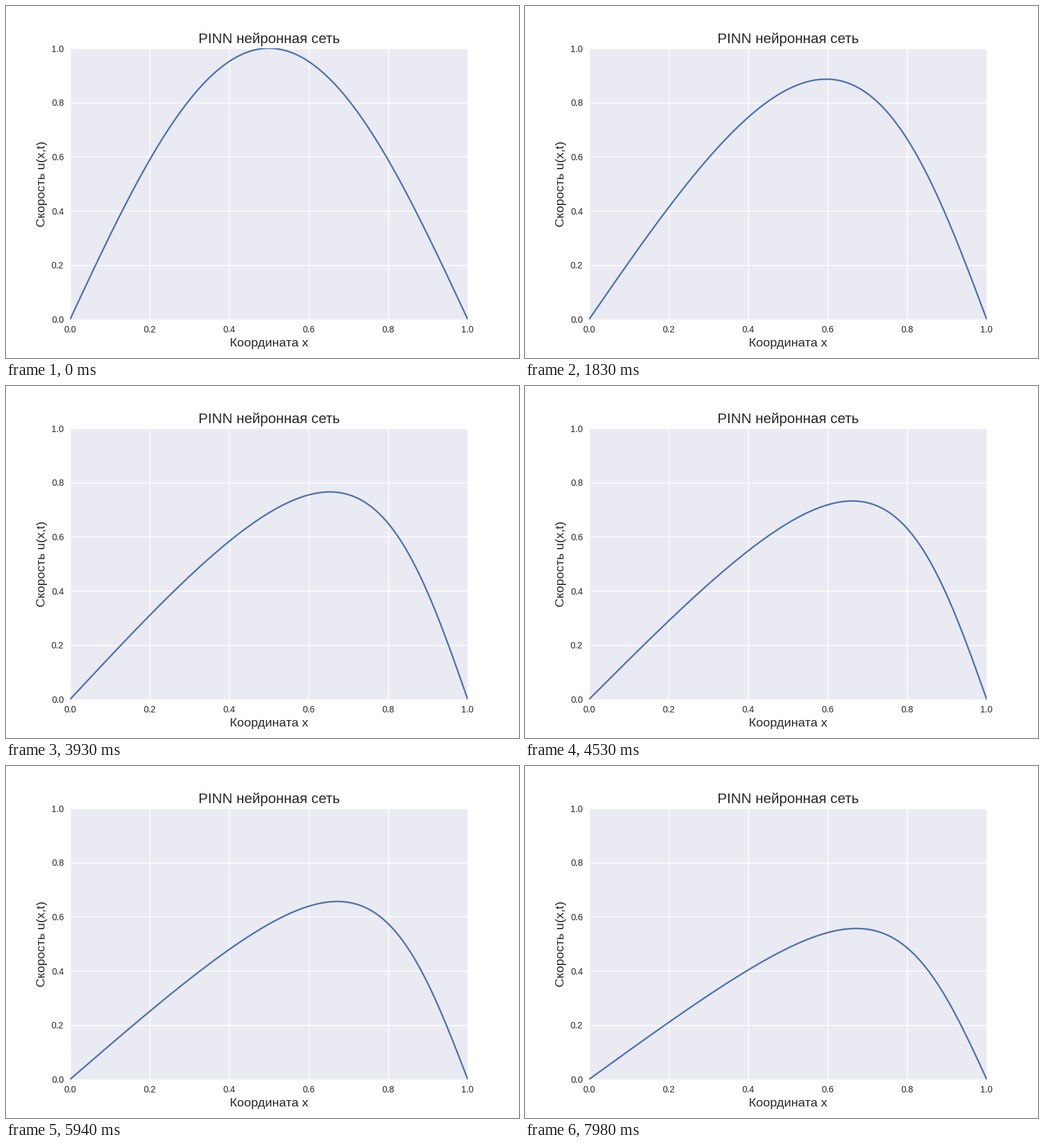
These frames come from a looping animation (800x550 px, 8 s). A matplotlib script:

```python
import numpy as np
import matplotlib.pyplot as plt
from matplotlib.animation import FuncAnimation

plt.style.use("seaborn-v0_8")
plt.rcParams["font.family"] = "Liberation Sans"

NU = 0.1           # viscosity
DT = 0.002         # model time per step
STEP_MS = 30       # screen time per step
INTERVAL = 20
LOOP_MS = 8000

x = np.linspace(0, 1, 301)
n = np.arange(1, 16)[:, None]

# Bessel coefficients I_n(z) of the Cole-Hopf series
z = 1 / (2 * np.pi * NU)
theta = np.linspace(0, 2 * np.pi, 256, endpoint=False)
weight = np.exp(z * np.cos(theta))
i0 = weight.mean()
coef = (weight * np.cos(n * theta)).mean(axis=1, keepdims=True)
sines = np.sin(n * np.pi * x)
cosines = np.cos(n * np.pi * x)


def velocity(t):
    """Burgers equation solution that starts from sin(pi x)."""
    a = coef * np.exp(-NU * (n * np.pi) ** 2 * t)
    top = 4 * np.pi * NU * (n * a * sines).sum(axis=0)
    return top / (i0 + 2 * (a * cosines).sum(axis=0))


fig = plt.figure(figsize=(8, 5.5), dpi=100)
ax = fig.add_axes([0.125, 0.11, 0.775, 0.77])
ax.set_xlim(0, 1)
ax.set_ylim(0, 1)
ax.set_title("PINN нейронная сеть", fontsize=16)
ax.set_xlabel("Координата x", fontsize=14)
ax.set_ylabel("Скорость u(x,t)", fontsize=14)
line, = ax.plot(x, velocity(0), color="#4C72B0", lw=1.75)


def update(i):
    step = (i * INTERVAL + INTERVAL // 2) // STEP_MS
    line.set_ydata(velocity(step * DT))
    return line,


anim = FuncAnimation(fig, update, frames=LOOP_MS // INTERVAL,
                     interval=INTERVAL, repeat=True, repeat_delay=0)
plt.show()
```
